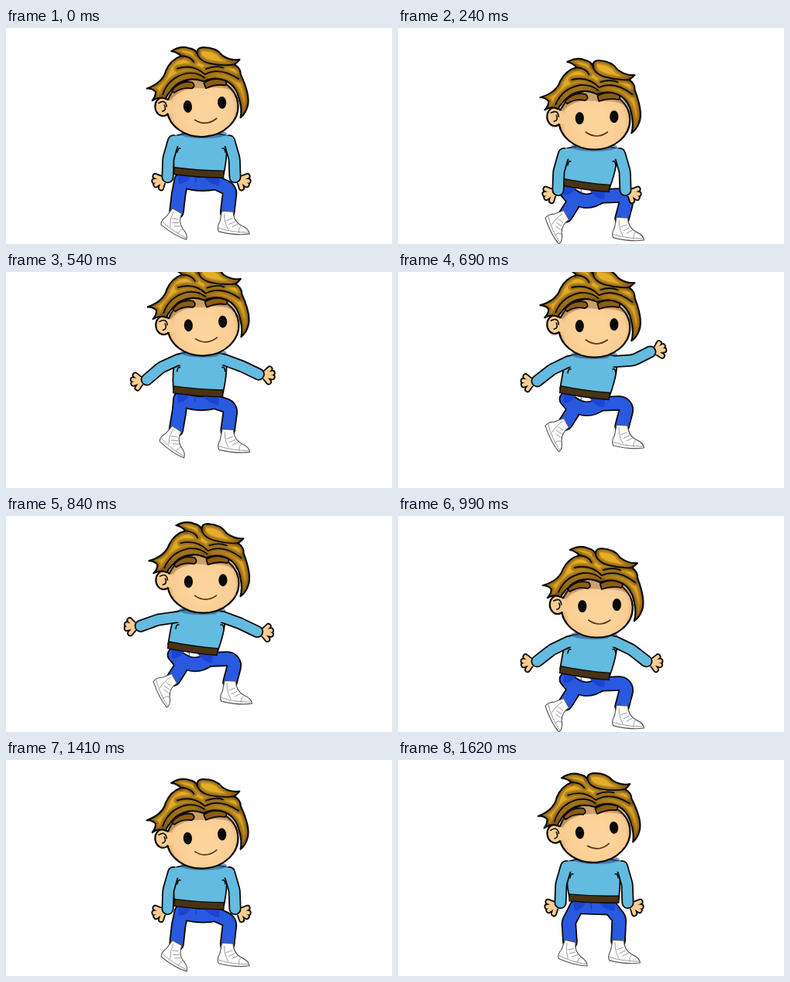
Write an HTML page with a canvas that moves like this. It is 498 px wide and 280 px high and loops after 1650 ms.

```html
<!DOCTYPE html>
<html lang="en">
<head>
<meta charset="utf-8">
<title>Jumping boy</title>
<style>
html, body { margin: 0; width: 100%; height: 100%; overflow: hidden; background: #fff; }
canvas { display: block; width: 498px; height: 280px; }
</style>
</head>
<body>
<canvas id="stage" width="498" height="280"></canvas>
<script>
const ctx = document.getElementById('stage').getContext('2d');
const LOOP = 1650, STEP = 30, INK = '#0b0a08';
const SHIRT = '#63bbdf', PANTS = '#2859df', SKIN = '#f9cd92', DEG = Math.PI / 180;

const progress = (t, a, b) => Math.min(1, Math.max(0, (t - a) / (b - a)));
const ease = (t, a, b) => { const u = progress(t, a, b); return u * u * (3 - 2 * u); };
const bump = (t, a, b) => Math.sin(Math.PI * progress(t, a, b)) ** 2;
const arc = (t, a, b) => { const u = progress(t, a, b); return 4 * u * (1 - u); };
const swing = ([x, y], angle, length, side) =>
  [x + side * length * Math.sin(angle * DEG), y + length * Math.cos(angle * DEG)];

// Crouch, jump height and arm spread drive every joint. Arm angles count outward from straight down.
function poseAt(t) {
  const crouch = ease(t, -150, 240) - ease(t, 250, 420) + ease(t, 420, 690) - ease(t, 1060, 1620);
  const air = arc(t, 405, 960), lift = 47 * air;
  const spread = ease(t, 280, 420) - ease(t, 1000, 1190);
  const elbowOut = bump(t, 300, 560), wave = bump(t, 480, 900), flap = bump(t, 690, 990);
  const chest = [253 - 3 * crouch, 130 + 25 * crouch - lift];
  const waist = [253 - 12 * crouch, 179 + 24 * crouch - lift];
  const tilt = (2 + 6 * crouch) * DEG;

  const arm = (side, upper, fore) => {
    const shoulder = [chest[0] + side * (36 - 6 * spread), chest[1] + 8];
    const elbow = swing(shoulder, 16 + 48 * spread + upper, 24, side);
    return { side, shoulder, elbow, wrist: swing(elbow, 2 + 50 * spread + fore, 24, side) };
  };
  const leg = (side, ankle, bendX, bendY, turn, size) => {
    const hip = [
      waist[0] + side * 22 * Math.cos(tilt) - 12 * Math.sin(tilt),
      waist[1] + side * 22 * Math.sin(tilt) + 12 * Math.cos(tilt)
    ];
    const knee = [(hip[0] + ankle[0]) / 2 + bendX, (hip[1] + ankle[1]) / 2 + bendY];
    return { hip, knee, ankle, turn, size };
  };

  return {
    crouch, chest, waist, tilt,
    head: [256.3 + 3.5 * spread * (1 - air), 91 + 25 * crouch - lift],
    nod: 6 * (crouch - 1) * DEG,
    arms: [
      arm(-1, 24 * elbowOut + 18 * flap, 18 * flap - 48 * elbowOut),
      arm(1, 30 * wave, 65 * wave)
    ],
    legs: [
      leg(-1, [222 - 6 * crouch, 236 + 7 * crouch - lift], 17 * crouch - 6, -3, 17 + 48 * crouch, 0.86),
      leg(1, [284 + 5 * crouch, 235 + 12 * crouch - lift], 6 + 16 * crouch, -8 - 8 * crouch, 7, 0.9)
    ]
  };
}

function line(path, color, width) {
  ctx.strokeStyle = color;
  ctx.lineWidth = width;
  ctx.stroke(path);
}

function shape(d, fill, ink = INK, width = 1.8) {
  const path = new Path2D(d);
  if (fill) { ctx.fillStyle = fill; ctx.fill(path); }
  if (ink) line(path, ink, width);
}

function oval(x, y, rx, ry, fill, ink, width = 1.8) {
  const path = new Path2D();
  path.ellipse(x, y, rx, ry, 0, 0, 7);
  ctx.fillStyle = fill;
  ctx.fill(path);
  if (ink) line(path, ink, width);
}

function place([x, y], angle, sx, sy, draw) {
  ctx.save();
  ctx.translate(x, y);
  ctx.scale(sx, sy);
  ctx.rotate(angle);
  draw();
  ctx.restore();
}

function bend(a, b, c, radius) {
  const path = new Path2D();
  path.moveTo(...a);
  path.arcTo(...b, ...c, radius);
  path.lineTo(...c);
  return path;
}

// Outlines every stroke before filling, so the parts read as one shape.
function merge(paths, color, width) {
  paths.forEach(p => line(p, INK, width + 3.6));
  paths.forEach(p => line(p, color, width));
}

function drawHand({ elbow, wrist, side }) {
  const forearm = Math.atan2(wrist[1] - elbow[1], side * (wrist[0] - elbow[0]));
  place(wrist, forearm * 0.35 - 10 * DEG, side, 1, () => {
    const fingers = [-45, -12, 15, 55].map(a =>
      new Path2D(`M6 1L${6 + 12 * Math.cos(a * DEG)} ${1 + 11 * Math.sin(a * DEG)}`));
    merge([...fingers, new Path2D('M0 0L7 1')], SKIN, 4.6);
    oval(6, 1, 5, 5, SKIN);
  });
}

function drawShoe({ ankle, turn, size }) {
  place(ankle, turn * DEG, size, size, () => {
    shape('M-8-1L8-2Q10 11 21 16Q34 20 35 27Q18 32-9 29Q-13 24-9 14Z', '#fdfdfd', '#555', 1.3);
    shape('M-10 24Q10 28 34 25M-4 3Q-3 15 4 24M8 8L0 12M12 12L4 17M17 15L9 20M22 17Q18 21 20 27', null, '#999', 1);
  });
}

function drawLegs({ legs, waist, tilt, crouch }) {
  const [left, right] = legs.map(l => l.hip);
  const seat = new Path2D();
  seat.moveTo(...left);
  seat.quadraticCurveTo(waist[0], waist[1] + 12 + 18 * crouch, ...right);
  merge([...legs.map(l => bend(l.hip, l.knee, l.ankle, 9)), seat], PANTS, 16);
  place(waist, tilt, 1, 1, () => {
    shape('M-27 5L-10 5Q-14 16-25 17ZM27 5L6 5Q14 15 27 16Z', '#1c43d2', null);
    shape('M-4 5L-3 14', null, '#1735a5', 1);
  });
  legs.forEach(drawShoe);
}

function drawTorso({ chest: [cx, cy], waist, tilt }) {
  const [wx, wy] = waist, drop = 32 * Math.sin(tilt);
  shape(`M${cx - 32} ${cy + 1}Q${cx} ${cy - 7} ${cx + 32} ${cy + 1}
    Q${cx + 35} ${cy + 20} ${wx + 32} ${wy + drop}L${wx - 32} ${wy - drop}
    Q${cx - 38} ${cy + 22} ${cx - 32} ${cy + 1}Z`, SHIRT);
  oval(cx + 3, cy - 1, 30, 6, 'rgba(46,88,145,.6)');
  place(waist, tilt, 1, 1, () => shape('M-32-4Q0-2 32-4L32 5Q0 7-32 5Z', '#493312', INK, 1.4));
}

function drawArm(arm, chest) {
  const { side, shoulder, elbow, wrist } = arm;
  drawHand(arm);
  merge([bend(shoulder, elbow, wrist, 20)], SHIRT, 12.5);
  oval(shoulder[0] - side * 4, shoulder[1], 7, 7, SHIRT);
  const x = chest[0] + side * 30, y = chest[1];
  shape(`M${x - side * 3} ${y + 18}Q${x} ${y + 16} ${x + side} ${y + 23}`, null, INK, 1.5);
}

function gradient(g, ...colors) {
  colors.forEach((c, i) => g.addColorStop(i / (colors.length - 1), c));
  return g;
}
const hairFill = gradient(ctx.createLinearGradient(0, 36, 0, 128), '#e6b02a', '#dfa826', '#c98d1f');
const faceFill = gradient(ctx.createRadialGradient(255, 122, 18, 255, 116, 50), '#fcd39a', '#fad096', SKIN, '#d49c60');

function drawHead(at, nod) {
  place(at, nod, 1, 1, () => {
    ctx.translate(-257, -112);
    oval(254, 115, 46, 38.5, faceFill, INK, 2.2);
    oval(203, 111, 10, 12, SKIN, INK, 2.2);
    oval(211, 112, 5, 9, SKIN);
    shape('M198 106Q207 101 208 111M202 117Q208 116 205 109', null, INK, 1.6);
    shape('M212 95Q222 82 242 79L286 81Q296 89 298 100Q287 89 257 91Q229 87 213 104Z', 'rgba(120,70,20,.35)', null);
    shape('M216 91Q227 78 243 82Q248 87 242 90Q230 87 219 94Z', '#8d5c12', INK, 1.8);
    shape('M258 84Q270 77 285 82Q289 86 285 89Q274 86 260 91Z', '#8d5c12', INK, 1.8);
    const hair = new Path2D(`M184 86Q205 80 210 65Q217 51 231 47Q226 41 219 40Q232 33 243 38Q250 40 252 45
      Q252 38 260 38Q277 39 284 50Q294 58 306 57Q302 61 299 63Q307 69 306 76
      Q317 105 312 118Q309 127 302 132Q305 122 302 108Q299 90 286 83Q272 76 258 82
      Q239 73 222 84Q213 91 207 101Q199 97 190 102Q195 97 195 91Q191 86 184 86Z`);
    const strands = new Path2D(`M204 95Q213 74 236 70Q250 69 259 77M225 63Q246 58 260 73Q280 64 303 82
      M252 45Q254 56 270 60Q284 64 299 63M231 47Q243 48 247 56M262 66Q274 62 284 66`);
    ctx.fillStyle = hairFill;
    ctx.fill(hair);
    ctx.save();
    ctx.clip(hair);
    for (const path of [hair, strands]) for (const width of [10, 6]) line(path, 'rgba(95,58,8,.3)', width);
    ctx.restore();
    line(hair, INK, 2.2);
    line(strands, INK, 1.9);
    oval(235, 113, 5.6, 8, '#080808');
    oval(279.5, 111, 5.6, 8, '#080808');
    shape('M243 131Q257 141 271 131', null, '#5b3518', 1.7);
  });
}

function draw(t) {
  const pose = poseAt(t);
  ctx.fillStyle = '#fff';
  ctx.fillRect(0, 0, 498, 280);
  ctx.lineJoin = ctx.lineCap = 'round';
  drawLegs(pose);
  drawTorso(pose);
  pose.arms.forEach(arm => drawArm(arm, pose.chest));
  drawHead(pose.head, pose.nod);
}

function tick(now) {
  draw(Math.floor(now % LOOP / STEP) * STEP);
  requestAnimationFrame(tick);
}
requestAnimationFrame(tick);
</script>
</body>
</html>
```
